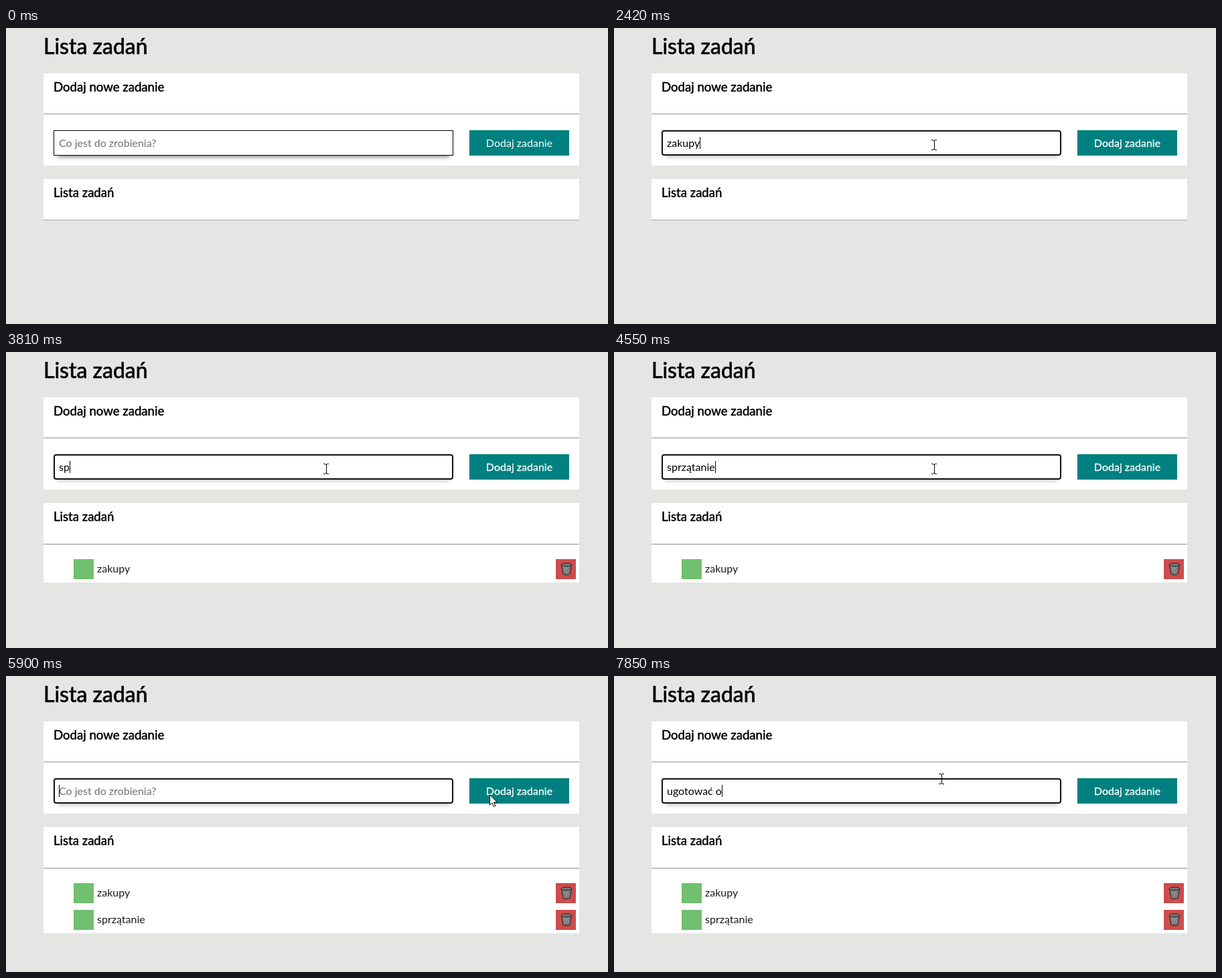
Recreate the animation shown at these times as an HTML page. Size 899 by 443 pixels, loop 8000 ms.

```html
<!DOCTYPE html>
<html lang="pl">
<head>
<meta charset="utf-8">
<title>Lista zadań</title>
<style>
html, body { margin: 0; width: 100%; height: 100%; overflow: hidden; background: #e5e5e4; }
#stage { position: relative; width: 899px; height: 443px; overflow: hidden;
  font: 16px/1.2 Lato, sans-serif; color: #000; }
#stage div, #stage svg { position: absolute; box-sizing: border-box; white-space: pre; }
.card { left: 56px; width: 800px; background: #fff; }
.rule { left: 56px; width: 800px; height: 2px; border-top: 1px solid #9a9a9a; background: #eee; }
.title { left: 56px; top: 8px; font-size: 32px; -webkit-text-stroke: .022em; }
.head { left: 71px; font-size: 18.6px; -webkit-text-stroke: .026em; }
#field { left: 71px; top: 153px; width: 597px; height: 38px; background: #fff;
  border: 1px solid #000; box-shadow: 0 8px 6px -6px rgba(0,0,0,.5); }
.focus #field { border: 2px solid #101010; border-radius: 4px; box-shadow: 0 8px 6px -6px rgba(0,0,0,.25); }
#hint, #typed { left: 79px; top: 162px; }
#hint { color: #707070; }
#caret { position: absolute; width: 1px; height: 18px; margin-top: 1px; background: #000; }
#button { left: 692px; top: 153px; width: 149px; height: 38px; background: #008080;
  color: #fff; line-height: 19px; padding-top: 9px; text-align: center; }
.focus #button { -webkit-text-stroke: .3px; }
.row { left: 0; }
.done { left: 101px; width: 30px; height: 30px; background: #70c070; }
.remove { left: 821px; width: 30px; height: 30px; background: #cd4c4c; }
.label { left: 136px; top: 4px; color: #1c1c1c; }
#halo { width: 24px; height: 24px; border-radius: 50%; background: rgba(255,220,0,.6); }
</style>
</head>
<body>
<div id="stage">
  <div class="title">Lista zadań</div>
  <div class="card" style="top:68px;height:138px"></div>
  <div class="head" style="top:77px">Dodaj nowe zadanie</div>
  <div class="rule" style="top:128px"></div>
  <div id="field"></div>
  <div id="hint">Co jest do zrobienia?</div>
  <div id="typed"><span></span><i id="caret"></i></div>
  <div id="button">Dodaj zadanie</div>
  <div class="card" id="list" style="top:226px"></div>
  <div class="head" style="top:235px">Lista zadań</div>
  <div class="rule" style="top:287px"></div>
  <div id="halo"></div>
  <svg id="beam" width="8" height="17" viewBox="0 0 8 17" fill="none" stroke="#000">
    <path d="M0 .5H3M5 .5H8M0 15.5H3M5 15.5H8M3 1.5H5M3 14.5H5M4 2V14" shape-rendering="crispEdges"/>
  </svg>
  <svg id="arrow" width="13" height="20" viewBox="0 0 13 20">
    <path d="M.5 .8V16.2L4 12.9L6.4 18.4L8.9 17.3L6.5 12H11.5Z" fill="#fff" stroke="#000"/>
  </svg>
</div>
<script>
const LOOP = 8000, TICK = 67.2, BLINK = 520;
const ENTER = 130, FOCUS = 1090, PRESS = 5700, REFOCUS = 5830;
const $ = id => document.getElementById(id);
const stage = $('stage'), typed = $('typed').firstChild;

const TASKS = [
  { text: 'zakupy', from: 1680, to: 2420, added: 2880 },
  { text: 'sprzątanie', from: 3480, to: 4550, added: REFOCUS },
  { text: 'ugotować o', from: 6990, to: 7850, added: LOOP }
];
// Typing speeds up a little towards the end of each word
for (const task of TASKS) {
  const { text, from, to } = task;
  task.keys = [...text].map((_, i) => from + (to - from) * (i / (text.length - 1)) ** .75);
}
const caretResets = [FOCUS, REFOCUS, ...TASKS.flatMap(task => task.keys)];

const BIN = `<svg width="18" height="20" viewBox="0 0 18 20" style="left:7px;top:5px">
  <path d="M1.5 3.5L4 17.5Q9 20 14 17.5L16.5 3.5Z" fill="#777" stroke="#222"/>
  <path d="M4 6L12 17M8 6L14 14M13 6L5 16M9 6L4 12" stroke="#aaa" stroke-width=".8"/>
  <ellipse cx="9" cy="3.4" rx="8" ry="2.4" fill="#777" stroke="#222"/></svg>`;
const rows = TASKS.slice(0, 2).map(({ text }, i) => {
  const row = document.createElement('div');
  row.className = 'row';
  row.style.top = 310 + 40 * i + 'px';
  row.innerHTML = `<div class="done"></div><div class="label">${text}</div><div class="remove">${BIN}</div>`;
  $('halo').before(row);
  return row;
});

// Pointer legs: each eases from the previous stop to its own
const ENTRY = { x: 833, y: 426 };
const LEGS = [
  { from: ENTER, to: 540, x: 470, y: 166 },
  { from: 540, to: 610, x: 483, y: 190 },
  { from: 800, to: 950, x: 483, y: 179 },
  { from: 1080, to: 1150, x: 478, y: 175 },
  { from: 5090, to: 5690, x: 722, y: 177 },
  { from: 5890, to: 6580, x: 489, y: 154 }
];

const show = (el, on) => { el.style.display = on ? '' : 'none'; };
const place = (el, x, y) => { el.style.left = x + 'px'; el.style.top = y + 'px'; };
const within = (t, start, length) => t >= start && t < start + length;
const smooth = k => k * k * (3 - 2 * k);

function pointerAt(t) {
  return LEGS.reduce((p, leg) => {
    const k = smooth(Math.min(1, Math.max(0, (t - leg.from) / (leg.to - leg.from))));
    return { x: p.x + (leg.x - p.x) * k, y: p.y + (leg.y - p.y) * k };
  }, ENTRY);
}

function drawPointer(t) {
  const p = pointerAt(Math.floor((t + 10) / TICK) * TICK);
  const x = Math.round(p.x), y = Math.round(p.y);
  const overField = x >= 71 && x < 668 && y >= 153 && y < 191;
  show($('beam'), t >= ENTER && overField);
  show($('arrow'), t >= ENTER && !overField);
  show($('halo'), within(t, FOCUS, 190) || within(t, PRESS, 190));
  place($('beam'), x - 4, y - 8);
  place($('arrow'), x, y);
  place($('halo'), x - 12, y - 12);
}

function draw(t) {
  const { text, keys } = TASKS.find(task => t < task.added);
  typed.textContent = text.slice(0, keys.filter(key => key <= t).length);
  show($('hint'), !typed.textContent);

  const focused = t >= FOCUS && !within(t, PRESS, REFOCUS - PRESS);
  const idle = t - Math.max(...caretResets.filter(reset => reset <= t));
  show($('caret'), focused && idle % (2 * BLINK) < BLINK);
  stage.classList.toggle('focus', focused);

  const count = TASKS.filter(task => t >= task.added).length;
  rows.forEach((row, i) => show(row, i < count));
  $('list').style.height = (count ? 79 + 40 * count : 63) + 'px';
  drawPointer(t);
}

const start = performance.now();
function frame() {
  draw((performance.now() - start) % LOOP);
  requestAnimationFrame(frame);
}
frame();
</script>
</body>
</html>
```
